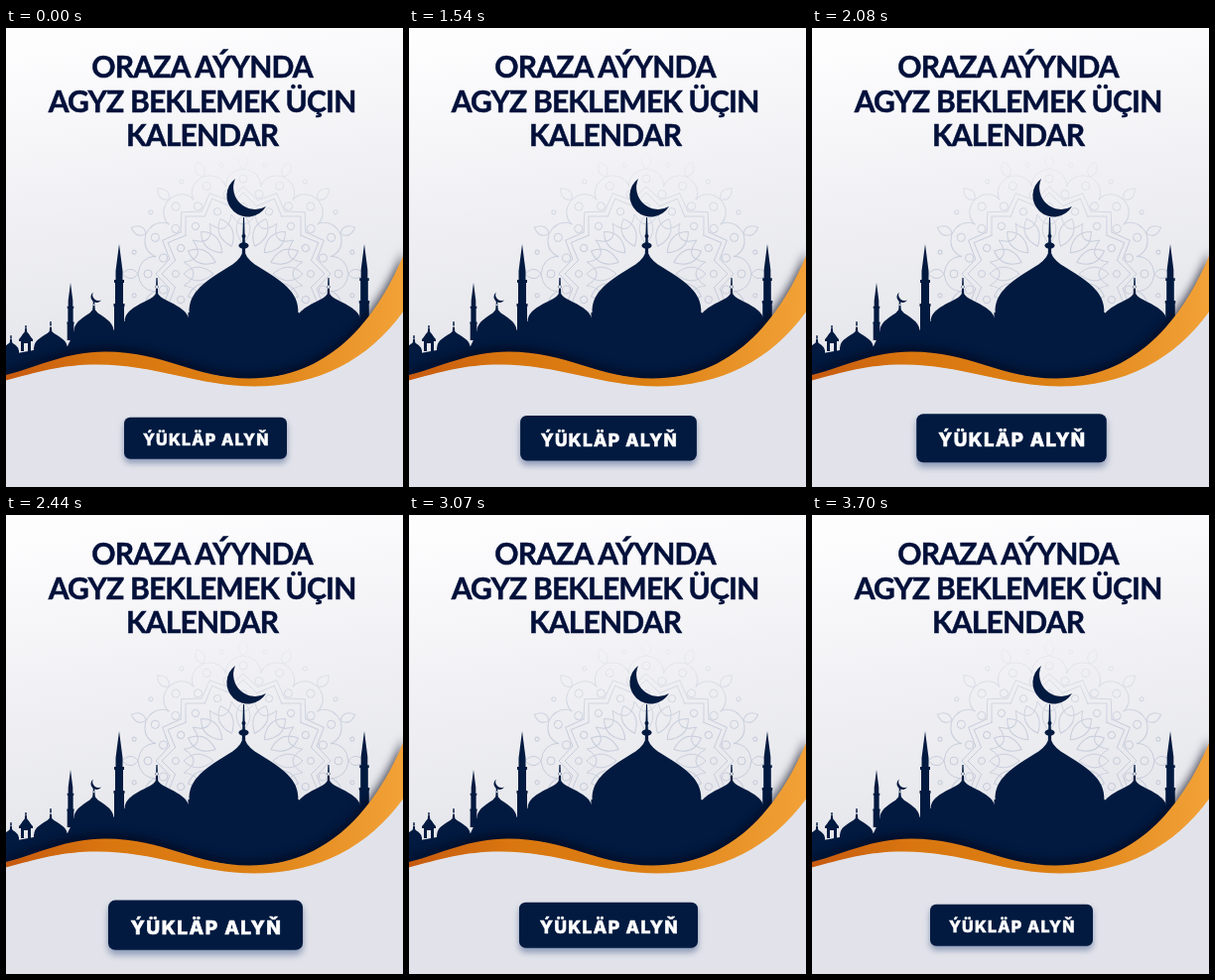
An HTML page for the animation above (4.7 s loop, 400 by 463 pixels).

```html
<!DOCTYPE html>
<html lang="tk">
<head>
<meta charset="utf-8">
<style>
html, body { margin: 0; width: 100%; height: 100%; overflow: hidden; background: #e2e3ea; }
svg { display: block; width: 100%; height: 100%; }
text { text-anchor: middle; }
.title { font: 700 30px Lato, "Open Sans", sans-serif; letter-spacing: -.8px; fill: #02103a; stroke: #02103a; stroke-width: .5px; }
.label { font: 800 16px Inter, "Open Sans", sans-serif; letter-spacing: 1.2px; fill: #fff; stroke: #fff; stroke-width: .5px; }
#city { fill: #021a40; }
#petals { fill: none; stroke: #c6ccda; stroke-width: 1; }
#wave { fill: url(#gold); filter: drop-shadow(0 -5px 4px rgba(0, 4, 24, .65)); }
#button rect { fill: #021a40; filter: drop-shadow(0 4px 3px rgba(50, 75, 130, .5)); }
</style>
</head>
<body>
<svg viewBox="0 0 400 463">
  <defs>
    <linearGradient id="sky" x1=".4" y1="0" x2=".55" y2="1">
      <stop offset="0" stop-color="#fdfdfe"/>
      <stop offset=".45" stop-color="#f0f0f4"/>
      <stop offset=".85" stop-color="#e5e6eb"/>
    </linearGradient>
    <linearGradient id="gold">
      <stop offset="0" stop-color="#c65a10"/>
      <stop offset=".25" stop-color="#d9760f"/>
      <stop offset=".6" stop-color="#dc8014"/>
      <stop offset="1" stop-color="#f2a238"/>
    </linearGradient>
    <linearGradient id="fade" x2="0" y2="1">
      <stop offset="0" stop-color="#000"/>
      <stop offset=".5" stop-color="#fff"/>
    </linearGradient>
    <mask id="veil"><rect y="120" width="400" height="200" fill="url(#fade)"/></mask>
  </defs>
  <rect width="400" height="370" fill="url(#sky)"/>
  <g mask="url(#veil)"><g id="petals" transform="translate(239 248)"></g></g>
  <g id="city">
    <path d="M0 330L28 325L62 321L68 308L108 305L119 299L184 292H296L366 294L340 340L245 356L100 332L0 352Z"/>
    <path id="moon" d="M231 152A21.3 21.3 0 1 0 262 180A22 22 0 0 1 231 152Z"/>
    <use href="#moon" transform="translate(91 272) scale(.27) translate(-243 -172)"/>
    <path d="M239 191h1l1.200 36h-3.400Z"/>
    <circle cx="239.5" cy="210" r="2"/>
    <ellipse cx="239.5" cy="219.5" rx="5" ry="3.200"/>
    <path d="M13 314L20 306L27 314V316H25V326H22V318H18V326H15V316H13Z"/>
  </g>
  <path id="wave" d="M0 350C35 341 60 326.500 100 326.500C160 326.500 190 353.500 245 353.500C325 353.500 372 296 400 230V287C365 335 315 362 250 362C195 362 150 340 92 340C55 340 30 348 0 356Z"/>
  <path fill="#e2e3ea" d="M0 355.500C30 347.500 55 339.500 92 339.500C150 339.500 195 361.500 250 361.500C315 361.500 365 334.500 400 286.500V463H0Z"/>
  <text class="title" x="197.600" y="50.300">ORAZA AÝYNDA</text>
  <text class="title" x="197.600" y="84.700">AGYZ BEKLEMEK ÜÇIN</text>
  <text class="title" x="197.600" y="119">KALENDAR</text>
  <g id="button">
    <rect x="-82" y="-21" width="164" height="42" rx="6"/>
    <text class="label" x=".8" y="7.500">ÝÜKLÄP ALYŇ</text>
  </g>
</svg>
<script>
const get = id => document.getElementById(id);

function add(parent, d, transform = '') {
  const path = document.createElementNS('http://www.w3.org/2000/svg', 'path');
  path.setAttribute('d', d);
  path.setAttribute('transform', transform);
  get(parent).append(path);
}

const ring = (x, y, r) => `M${x - r} ${y}a${r} ${r} 0 1 0 ${2 * r} 0a${r} ${r} 0 1 0 ${-2 * r} 0`;

// Onion dome with a drum below it and an optional finial
function dome(x, top, w, h, drum, finial) {
  add('city', 'M0 0Q-.02 .14 -.2 .25C-.68 .5 -1 .66 -.98 1H.98C1 .66 .68 .5 .2 .25Q.02 .14 0 0Z',
    `translate(${x} ${top}) scale(${w} ${h})`);
  add('city', `M${x - w} ${top + h - 1}h${2 * w}v${drum}h${-2 * w}Z`);
  if (finial) add('city', `M${x - .6} ${top - finial}h1.2l.6 ${finial + 3}h-2.4Z` + ring(x, top - finial * .3, finial * .12));
}

function minaret(x, top, s) {
  add('city', 'M0 0L3.500 27V36H5V39H4V60H5.500V63H5V88H-5V63H-5.500V60H-4V39H-5V36H-3.500V27Z',
    `translate(${x} ${top}) scale(${s})`);
}

dome(239.5, 222, 56, 66, 25, 0);
dome(152, 265, 33, 32, 25, 13);
dome(325, 265, 33, 32, 25, 13);
dome(88.5, 281, 20.5, 26, 16, 6);
dome(45, 303, 17, 20, 9, 7);
dome(20, 304, 5, 10, 1, 4);
dome(5, 315, 8, 11, 8, 5);
minaret(114, 218, 1);
minaret(361, 218, .95);
minaret(65, 257, .66);
minaret(33, 314, .2);

const petal = 'M-18 -88Q-17 -104 0 -106Q17 -104 18 -88' +
  'M0 -106C-7 -111 -5 -117 0 -122C5 -117 7 -111 0 -106' +
  'M-15 -74L0 -88L15 -74M-14 -68L0 -82L14 -68' +
  'M-12 -60Q0 -40 12 -60M0 -30C-10 -42 -8 -52 0 -60C8 -52 10 -42 0 -30' +
  ring(0, -96, 4) + ring(0, -68, 3.5);
for (let a = 0; a < 360; a += 22.5) {
  add('petals', petal, `rotate(${a})`);
  add('petals', ring(0, -82, 4) + ring(0, -112, 2), `rotate(${a + 11.25})`);
}

// The button grows for 45 ticks of 30 ms, then shrinks for 45
function draw(now) {
  const tick = Math.floor((now % 4700 - 1000) / 30);
  const grow = Math.max(0, 1 - Math.abs(tick - 45) / 45);
  get('button').setAttribute('transform', `translate(201 413.7) scale(${1 + .21 * grow})`);
}

const start = performance.now();
function loop() {
  draw(performance.now() - start);
  requestAnimationFrame(loop);
}
loop();
</script>
</body>
</html>
```
